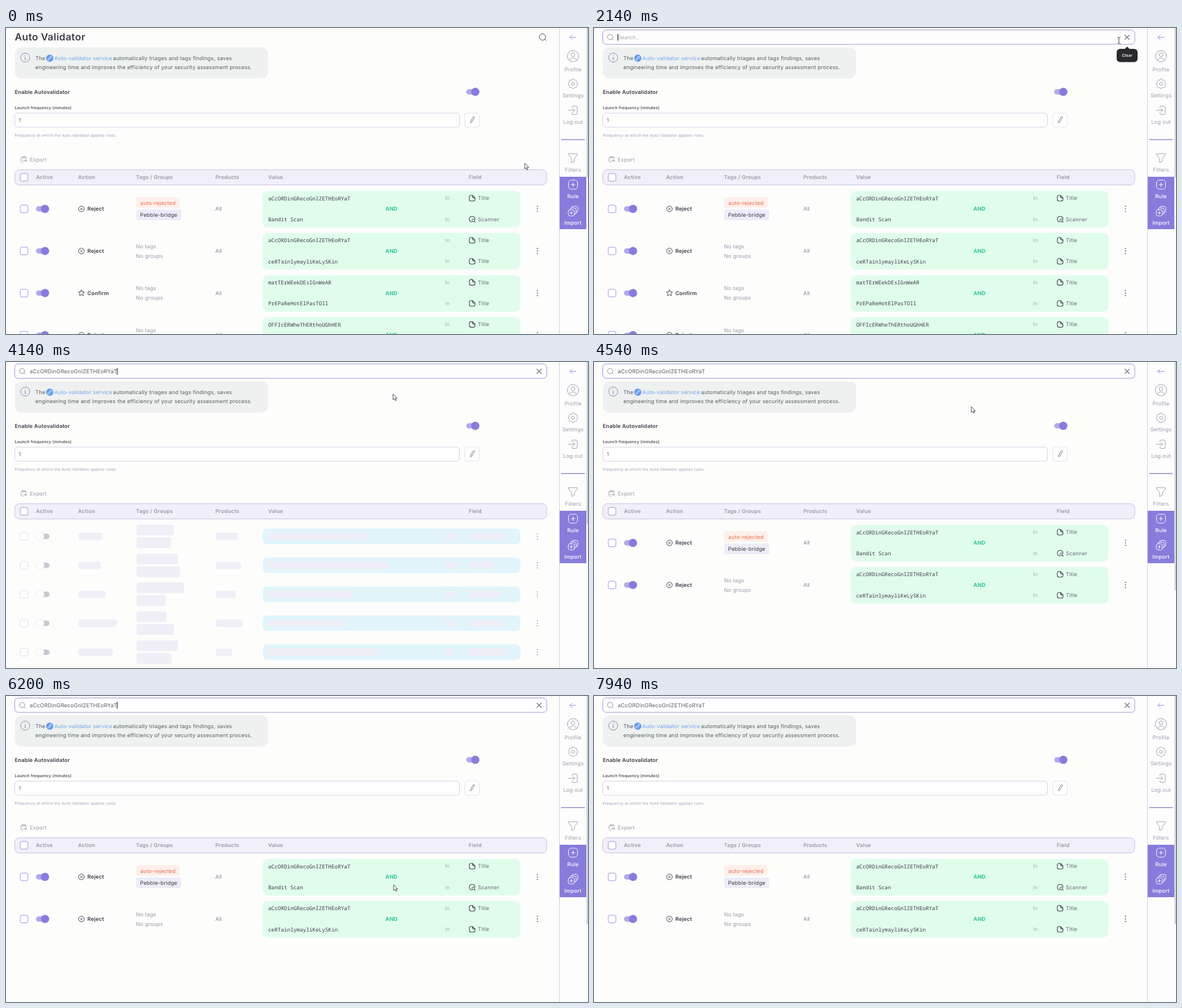
Write an HTML page that moves like this. It is 1030 px wide and 543 px high and loops after 7980 ms.

```html
<!DOCTYPE html>
<html lang="en">
<head>
<meta charset="utf-8">
<title>Auto Validator</title>
<style>
html, body { margin: 0; width: 100%; height: 100%; overflow: hidden; background: #fdfdfc; }
svg { display: block; width: 1030px; height: 543px; }
text { font-family: Inter, "Open Sans", sans-serif; letter-spacing: .02em; text-rendering: geometricPrecision; white-space: pre; }
.mono { font-family: "Roboto Mono", "Noto Sans Mono", monospace; letter-spacing: 0; }
.line { fill: none; stroke-linecap: round; stroke-linejoin: round; }
</style>
</head>
<body>
<svg id="stage" viewBox="0 0 1030 543" xmlns="http://www.w3.org/2000/svg"></svg>
<script>
const LOOP = 7980;
const INK = '#3c3c45', GREY = '#9a9aa7', SOFT = '#a8a8b3', VIOLET = '#877cdb', SIDE = '#9c9cad';
const QUERY = 'aCcORDinGRecoGnIZETHEoRYaT';

// y is the middle of the capital letters
const text = (x, y, s, { size = 9.4, fill = INK, weight = 400, anchor = 'start', cls = '' } = {}) =>
  `<text x="${x}" y="${(y + size * .36).toFixed(2)}" font-size="${size}" font-weight="${weight}" fill="${fill}" text-anchor="${anchor}" class="${cls}">${s}</text>`;
const rect = (x, y, w, h, r, fill, stroke = 'none', more = '') =>
  `<rect x="${x}" y="${y}" width="${w}" height="${h}" rx="${r}" fill="${fill}" stroke="${stroke}" ${more}/>`;
const circle = (x, y, r, fill, stroke = 'none') =>
  `<circle cx="${x}" cy="${y}" r="${r}" fill="${fill}" stroke="${stroke}"/>`;
const line = (d, stroke, w = 1) => `<path class="line" d="${d}" stroke="${stroke}" stroke-width="${w}"/>`;
const at = (x, y, s) => `<g transform="translate(${x} ${y})">${s}</g>`;
const layer = (id, s) => `<g id="${id}">${s}</g>`;

const ring = (n, radius, turn = -Math.PI / 2) => 'M' + Array.from({ length: n }, (_, i) => {
  const a = turn + i * 2 * Math.PI / n, r = radius(i);
  return `${(r * Math.cos(a)).toFixed(2)} ${(r * Math.sin(a)).toFixed(2)}`;
}).join('L') + 'Z';

const icon = {
  lens: (c, r) => circle(0, 0, r, 'none', c) + line(`M${r * .72} ${r * .72}l2.2 2.2`, c),
  cross: c => line('M-4 -4L4 4M4 -4L-4 4', c, 1.1),
  reject: c => circle(0, 0, 5, 'none', c) + line('M-1.6 -1.6L1.6 1.6M1.6 -1.6L-1.6 1.6', c),
  star: c => line(ring(10, i => i % 2 ? 2.8 : 5.6), c),
  page: c => line('M.5 -5H-2Q-5 -5 -5 -2V2Q-5 5 -2 5H2Q5 5 5 2V-.5ZM.5 -5V-3Q.5 -.5 3 -.5H5', c, 1.1),
  scan: c => line('M-.8 4.9Q-5 4.4 -5 0Q-5 -5 0 -5Q5 -5 5 0', c, 1.1) +
    circle(2, 2, 2.4, 'none', c) + line('M3.8 3.8L5.3 5.3', c, 1.1),
  out: c => line('M-1.5 5Q-5 5 -5 1.5V-1.5Q-5 -5 -1.5 -5H1.5Q4.5 -5 4.5 -2V-1M-2.5 -5V-3.2H2V-5', c) +
    line('M-.5 2H5M3 0L5 2L3 4', c),
  gear: c => line(ring(24, i => [8.6, 8.6, 6.8][i % 3], -Math.PI / 2 - .13), c, .9) + circle(0, 0, 2.7, 'none', c),
  profile: c => circle(0, 0, 10, 'none', c) + circle(0, -2.5, 3.2, 'none', c) + line('M-6 7.8Q-5 3 0 3T6 7.8', c),
  logout: c => line('M-2 -4.5V-5Q-2 -7.5 .5 -7.5H4.5Q7.5 -7.5 7.5 -4.5V4.5Q7.5 7.5 4.5 7.5H.5Q-2 7.5 -2 5V4.5M-8.5 0H3M0 -3L3 0L0 3', c),
  funnel: c => line('M-7.5 -8H7.5V-5.5L2.5 .5V5L-2.5 8V.5L-7.5 -5.5Z', c),
  plus: c => rect(-8, -8, 16, 16, 5, 'none', c) + line('M-3.5 0H3.5M0 -3.5V3.5', c),
  stack: c => rect(-8.5, -2.5, 11, 11, 3.5, 'none', c) + line('M-5.5 3H-.5M-3 .5V5.5', c) +
    line('M-5.5 -2.5Q-5.5 -5.5 -2.5 -5.5H2.5Q5.5 -5.5 5.5 -2.5V2.5Q5.5 5.5 2.5 5.5M-2.5 -5.5Q-2.5 -8.5 .5 -8.5H5.5Q8.5 -8.5 8.5 -5.5V-.5Q8.5 2.5 5.5 2.5', c)
};

const checkbox = (y, c = '#9c95d8', more = '') => rect(25.2, y - 6.8, 13.6, 13.6, 3, '#fff', c, more);
const toggle = (x, y) => rect(x, y - 4.7, 23, 9.4, 4.7, '#b1a9ea') + circle(x + 16, y, 7.3, VIOLET);
const dots = (y, c) => [-4.5, 0, 4.5].map(d => circle(940.5, y + d, 1.1, c)).join('');

function row(i, { action = 'Reject', tags, values }) {
  const top = 289 + 74.7 * i, y = top + 32;
  let s = checkbox(y) + toggle(53, y) +
    at(133.5, y, action === 'Reject' ? icon.reject(INK) : icon.star(INK)) +
    text(144, y, action, { weight: 600 }) + text(370.5, y, 'All', { fill: '#85858f' }) + dots(y, '#66666f');
  if (tags) {
    s += rect(230.5, y - 21, 76.5, 19, 3, '#ffefea') + text(269, y - 10.8, tags[0], { fill: '#e36c4d', anchor: 'middle' });
    s += rect(230.5, y + 1, 79.5, 19, 3, '#eeecf9') + text(270.3, y + 11, tags[1], { anchor: 'middle' });
  } else {
    s += text(230, y - 8.5, 'No tags', { fill: GREY }) + text(230, y + 8.5, 'No groups', { fill: GREY });
  }
  s += rect(454.5, top, 456, 65, 9, '#e0fdec') + text(682.3, y, 'AND', { fill: '#2fc399', weight: 700, anchor: 'middle' });
  values.forEach(([value, field], k) => {
    const vy = top + 13 + 37.3 * k;
    s += text(464, vy + .3, value, { size: 9.33, cls: 'mono' }) + text(777, vy, 'In', { fill: SOFT }) +
      at(825, vy, field === 'Title' ? icon.page(INK) : icon.scan(INK)) + text(835, vy, field, { fill: '#6a6a74' });
  });
  return s;
}

// widths: action, tag, group, product, value, operator, field
const BONES = [
  [42, 66, 61, 39, 174, 19, 62], [40, 73, 77, 45, 213, 22, 41], [48, 84, 52, 35, 149, 18, 55],
  [68, 53, 66, 48, 133, 13, 57], [61, 74, 62, 29, 194, 13, 64]
];
const BONE_X = [128, 231, 231, 371, 464, 778, 819];
function skeleton(widths, i) {
  const y = 309.5 + 51.4 * i;
  const bars = widths.map((w, k) => k === 1 || k === 2
    ? rect(BONE_X[k], y + (k === 1 ? -21 : 1.5), w, 19, 4, '#f0eef6')
    : rect(BONE_X[k], y - 6.5, w, 13, 4, '#f0eef6'));
  return checkbox(y, '#cfccdf', 'stroke-dasharray="2 1"') + rect(58, y - 4.7, 19, 9.4, 4.7, '#c8c8cf') +
    circle(60, y, 7.3, '#fdfdfc', '#ededf0') + rect(454.5, y - 14, 456, 27.5, 8, '#e1f5fb') + bars.join('') + dots(y, '#a9a9b2');
}

const sideItem = (name, y, label, ly, c = SIDE, weight = 400) =>
  at(1003.5, y, icon[name](c)) + text(1003.5, ly, label, { fill: c, weight, anchor: 'middle' });

const info = { fill: '#5a5a64' };
const base =
  rect(15.5, 34.5, 448.5, 55, 12, '#eef1f0') +
  circle(34, 52.5, 8, 'none', '#8587ab') + line('M34 51.5V56.5M34 48.6V48.7', '#8587ab', 1.2) +
  text(52, 53.5, 'The', info) + circle(77.5, 53.5, 6.3, '#5b97f2') +
  line('M76 55l3 -3M76.5 52l1.5 -1.5a1.6 1.6 0 0 1 2.4 2.4l-1 1M78.5 55l-1.5 1.5a1.6 1.6 0 0 1 -2.4 -2.4l1 -1', '#fff', .9) +
  text(85.5, 53.5, 'Auto-validator service', { fill: '#73a3ee' }) +
  text(189.5, 53.5, 'automatically triages and tags findings, saves', info) +
  text(52, 70, 'engineering time and improves the efficiency of your security assessment process.', info) +
  text(15.5, 113.5, 'Enable Autovalidator', { weight: 600 }) + toggle(814.5, 113.3) +
  text(15.5, 141, 'Launch frequency (minutes)', { size: 7.2, weight: 500 }) +
  rect(15.5, 151, 787, 25, 5, '#fefefe', '#d3d0e4') + text(22.5, 163.7, '1', { fill: '#66666f' }) +
  rect(812, 151, 25.5, 25, 4, '#fefefe', '#e3e1ec') +
  line('M822 168l.6 -3l4.2 -7.2q.8 -1 1.8 -.4t.4 1.7l-4.2 7.2z', '#6a6a74', .9) +
  text(15.5, 190, 'Frequency at which the Auto Validator applies rules.', { size: 7.07, fill: '#a2a2b5' }) +
  at(31.5, 233.5, icon.out(SIDE)) + text(42, 233.5, 'Export', { fill: GREY }) +
  rect(15.5, 251.5, 941.5, 27, 8, '#f1effa', '#c6c1e2') + checkbox(265) +
  [[53, 'Active'], [127.5, 'Action'], [230, 'Tags / Groups'], [370.5, 'Products'], [464, 'Value'], [819, 'Field']]
    .map(([x, s]) => text(x, 265, s, { fill: GREY, weight: 600 })).join('');

const sidebar =
  rect(979, 0, 51, 543, 0, '#fdfdfd') + line('M979.5 0V543', '#cfced9') +
  line('M1009 16.5H998M1002 12.5L998 16.5L1002 20.5', '#968fca') +
  sideItem('profile', 50, 'Profile', 73.5) + sideItem('gear', 99, 'Settings', 120) + sideItem('logout', 146, 'Log out', 167) +
  line('M983 198H1024', '#8f88c4', 1.4) + sideItem('funnel', 231, 'Filters', 252) +
  rect(980, 264, 47, 93, 0, VIOLET) +
  sideItem('plus', 278, 'Rule', 299, '#fff', 500) + sideItem('stack', 325, 'Import', 346, '#fff', 500) +
  '<rect id="thumb" x="1027.5" y="0" width="2.5" height="265" fill="#d0d0d6"/>';

const searchBar =
  rect(15.5, 3.5, 941.5, 25.5, 6, '#fefefe', '#9a94d6') +
  at(28.5, 16, icon.lens('#8a8a98', 4.6)) + at(943.5, 16.5, icon.cross('#6a6a82')) +
  layer('hint', text(42, 16.5, 'Search..', { fill: SOFT })) +
  layer('typed', text(42, 16.5, QUERY, { size: 9.5, fill: '#5c5c66' })) +
  '<rect id="caret" y="10.5" width="1.2" height="12" fill="#222"/>' +
  layer('tip', rect(925, 37, 37, 23.5, 6, '#29292e') + '<path d="M939 37.5L943.5 33L948 37.5Z" fill="#29292e"/>' +
    text(943.5, 48.7, 'Clear', { size: 7, fill: '#fff', weight: 600, anchor: 'middle' }));

const found = [
  { tags: ['auto-rejected', 'Pebble-bridge'], values: [[QUERY, 'Title'], ['Bandit Scan', 'Scanner']] },
  { values: [[QUERY, 'Title'], ['ceRTainlymayliKeLySKin', 'Title']] }
];
const others = [
  { action: 'Confirm', values: [['matTErWEekDEsIGnWeAR', 'Title'], ['PrEPaReHotElPasTOIl', 'Title']] },
  { values: [['OFFIcERWheThERthoUGhHER', 'Title']] }
];

const stage = document.getElementById('stage');
stage.innerHTML = rect(0, 0, 1030, 543, 0, '#fdfdfc') + base +
  layer('found', found.map((r, i) => row(i, r)).join('')) +
  layer('others', others.map((r, i) => row(i + 2, r)).join('')) +
  layer('bones', BONES.map(skeleton).join('')) + sidebar +
  layer('heading', text(15.5, 16, 'Auto Validator', { size: 17.5, weight: 600 }) + at(949.5, 16, icon.lens('#3c3c45', 5.6))) +
  layer('search', searchBar) +
  layer('arrow', '<path d="M0 0V10L2.4 8L4 11.6L5.6 10.9L4.1 7.4H7.2Z" fill="#fff" stroke="#33333a" stroke-width=".9" stroke-linejoin="round"/>') +
  layer('beam', line('M-2.2 -5.5Q0 -5.5 0 -4.5Q0 -5.5 2.2 -5.5M0 -4.5V4.5M-2.2 5.5Q0 5.5 0 4.5Q0 5.5 2.2 5.5', '#33333a'));

const part = {};
stage.querySelectorAll('[id]').forEach(e => part[e.id] = e);
const show = (id, on) => part[id].style.display = on ? '' : 'none';

const OPEN = 1650, PASTE = 2860, LOAD = 3500, DONE = 4500;
const PATH = [
  [0, 918, 240], [250, 918, 240], [1070, 961, 35], [1450, 948, 14], [1900, 944, 16], [2140, 929, 22],
  [2500, 842, 34], [3200, 696, 52], [3900, 685, 57], [4140, 685, 57], [5240, 628, 131], [6200, 686, 335], [7000, 722, 560], [LOOP, 722, 560]
];
const ease = k => k * k * (3 - 2 * k);
function pointer(t) {
  const i = PATH.findIndex(p => p[0] > t), [t0, x0, y0] = PATH[i - 1], [t1, x1, y1] = PATH[i];
  const k = ease((t - t0) / (t1 - t0));
  return [x0 + (x1 - x0) * k, y0 + (y1 - y0) * k];
}

function draw(t) {
  const open = t >= OPEN, pasted = t >= PASTE, loading = t >= LOAD && t < DONE;
  show('heading', !open);
  show('search', open);
  show('hint', !pasted);
  show('typed', pasted);
  show('tip', t < 2260);
  show('found', !loading);
  show('others', t < LOAD);
  show('bones', loading);
  const since = t - (pasted ? PASTE : OPEN);
  show('caret', since % 1060 < 530);
  const end = pasted ? 42 + part.typed.firstChild.getComputedTextLength() : 42;
  part.caret.setAttribute('x', end - .4);
  part.thumb.setAttribute('height', t < LOAD ? 265 : loading ? 287 : 405);

  const [x, y] = pointer(t), beam = t > 2050 && y < 29;
  show('beam', beam);
  show('arrow', !beam);
  part[beam ? 'beam' : 'arrow'].setAttribute('transform', `translate(${x.toFixed(1)} ${y.toFixed(1)})`);
}

const start = performance.now();
function tick() {
  draw((performance.now() - start) % LOOP);
  requestAnimationFrame(tick);
}
tick();
</script>
</body>
</html>
```
